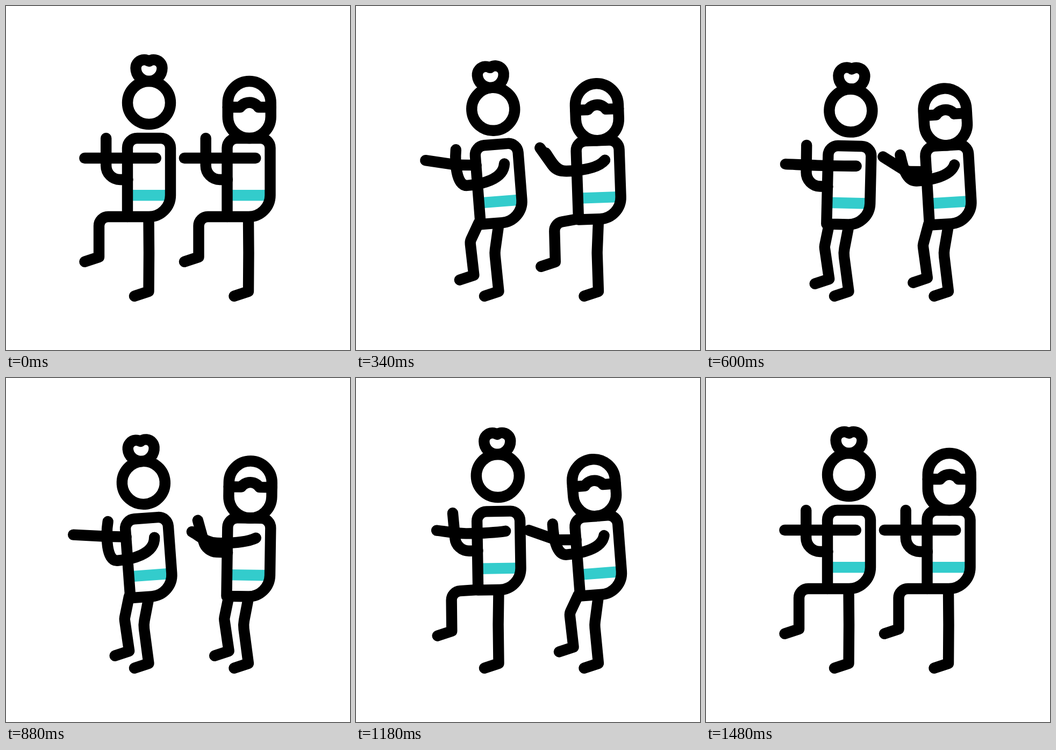
Animation of 640 by 640 pixels, one loop 1.6 s. Source, as an HTML page with a canvas:

```html
<!DOCTYPE html>
<html lang="en">
<head>
<meta charset="utf-8">
<title>Two dancers</title>
<style>
  html, body { margin: 0; width: 100%; height: 100%; overflow: hidden; background: #fff; }
  canvas { display: block; width: 640px; height: 640px; }
</style>
</head>
<body>
<canvas id="stage" width="640" height="640"></canvas>
<script>
const ctx = document.getElementById('stage').getContext('2d');
const LOOP = 1600, FRAME = 20, DELAY = 200;
const LINE = 20.4, INK = '#000', TEAL = '#33cccc';
const CENTER = 266, WAIST = 319, HIP = 392, SHOULDER = 283;

const mix = (a, b, k) => a + (b - a) * k;
const smooth = s => s * s * (3 - 2 * s);
const soft = s => mix(s, smooth(s), 0.3);
const ramp = (t, from, to) => Math.min(1, Math.max(0, (t - from) / (to - from)));

// Goes out and back twice, one beat each way; the last way back lasts until end.
function swing(t, beat, end) {
  const i = Math.min(3, Math.max(0, Math.floor(t / beat)));
  const s = smooth(ramp(t, i * beat, i < 3 ? (i + 1) * beat : end));
  return i % 2 ? 1 - s : s;
}

// Rises from 0 to 1, holds, and falls back.
const pulse = (t, rise, end, ease) => ease(ramp(t, 0, rise)) - ease(ramp(t, 880, end));

// The first swing leaves from upright, the second from a slight lean back.
function tiltAt(t) {
  const beat = 310;
  const rest = t > beat && t < 3 * beat ? 1.45 : 0;
  return mix(rest, -4.6, swing(t, beat, 1280));
}

function stroke(trace) {
  ctx.beginPath();
  trace();
  ctx.stroke();
}

// A limb bent at a rounded joint, optionally ending in a foot.
function limb(startX, startY, jointX, jointY, endX, endY, radius, foot) {
  stroke(() => {
    ctx.moveTo(startX, startY);
    ctx.arcTo(jointX, jointY, endX, endY, radius);
    ctx.lineTo(endX, endY);
    if (foot) ctx.lineTo(endX - 26.6, endY + 8.8);
  });
}

function legs(step, drop) {
  const hip = HIP + drop;
  limb(265.5, hip + 3, CENTER - 0.69 * drop, 459, 265.5, 531, 50, true);
  limb(mix(226, 229, step), hip,
    mix(173, 220.5, step), mix(HIP, 448, step),
    mix(173, 229.2, step), mix(467, 508, step), 17, true);
}

function arms(swap) {
  limb(mix(186.2, 128.5, swap), mix(246, 267, swap),
    mix(186.2, 190, swap), mix(323, 274.5, swap),
    226.5, mix(323, 278, swap), 26);

  const elbow = SHOULDER + 38 * swap;
  stroke(() => {
    ctx.moveTo(146.3 + 48.5 * swap, SHOULDER - 36 * swap);
    ctx.bezierCurveTo(167 + 22 * swap, SHOULDER - 11 * swap, 186, elbow, 207, elbow);
    ctx.bezierCurveTo(232, elbow, 255 + 22 * swap, SHOULDER + 32 * swap, 278.8, SHOULDER);
  });
}

function torso() {
  ctx.fillStyle = TEAL;
  ctx.fillRect(228, 342, 74, LINE);
  stroke(() => ctx.roundRect(226, 246, 80, 146, [18, 18, 40, 0]));
}

function bunHead() {
  stroke(() => ctx.arc(CENTER, 180, 40, 0, 2 * Math.PI));
  stroke(() => {
    ctx.arc(CENTER, 115.5, 24.5, 0, Math.PI);
    ctx.arc(CENTER - 9, 115.5, 15.5, Math.PI, -0.95);
    ctx.arc(CENTER + 9, 115.5, 15.5, 0.95 - Math.PI, 0);
  });
}

function longHairHead() {
  const x = 267.2, brow = 188.3;
  stroke(() => ctx.roundRect(x - 40, 140, 80, 106, 40));
  stroke(() => {
    ctx.moveTo(x - 40, brow);
    ctx.lineTo(x - 17, brow);
    ctx.arc(x, brow + 12.3, 21, -2.515, -0.626);
    ctx.lineTo(x + 40, brow);
  });
}

function dancer(t, x, head) {
  const drop = 14.5 * pulse(t, 450, 1240, soft);
  ctx.save();
  ctx.translate(x, 0);
  legs(pulse(t, 463, 1250, smooth), drop);
  ctx.translate(CENTER, WAIST + drop);
  ctx.rotate(tiltAt(t) * Math.PI / 180);
  ctx.translate(-CENTER, -WAIST);
  torso();
  head();
  arms(swing(t, 290, 1250));
  ctx.restore();
}

function draw() {
  const t = Math.floor(performance.now() % LOOP / FRAME) * FRAME;
  ctx.fillStyle = '#fff';
  ctx.fillRect(0, 0, 640, 640);
  ctx.strokeStyle = INK;
  ctx.lineWidth = LINE;
  ctx.lineCap = ctx.lineJoin = 'round';
  dancer(t, 0, bunHead);
  dancer(t - DELAY, 185.5, longHairHead);
  requestAnimationFrame(draw);
}
draw();
</script>
</body>
</html>
```
